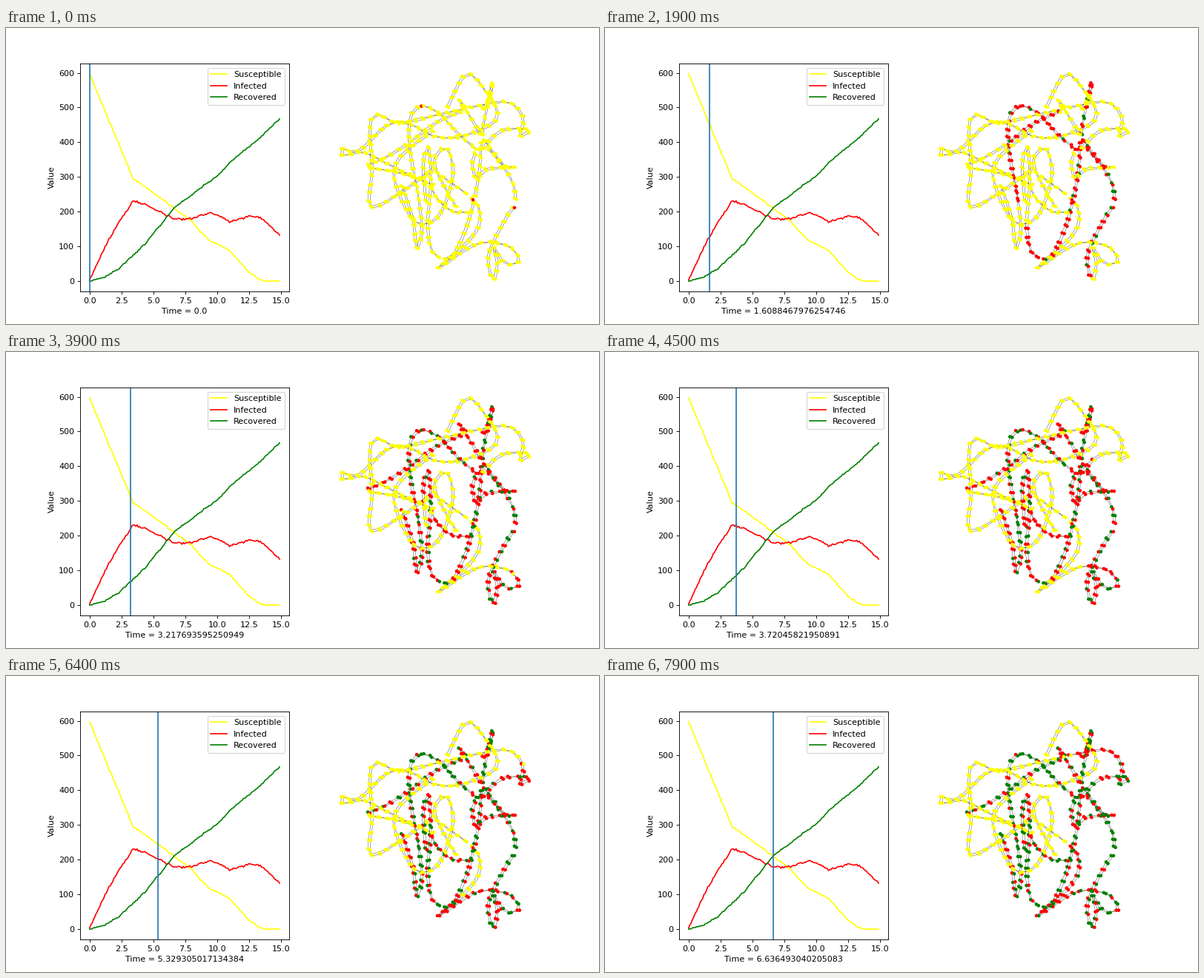
A matplotlib script that plays this animation: 800x400 px, repeating every 8000 ms.

```python
import numpy as np
import matplotlib.pyplot as plt
from matplotlib.animation import FuncAnimation
from matplotlib.collections import LineCollection

N = 600
FRAMES, INTERVAL = 80, 100
STEP = 0.10055292485159216
GAP = 11        # pixels between neighbouring pairs of nodes
RECOVERY = 5.0  # mean time a node stays infected
SEEDS = (632, 232), (558, 104), (688, 238)
COLORS = np.array([[1, 1, 0], [1, 0, 0], [0, 0.5, 0]])

rng = np.random.default_rng(11)
times = np.arange(149) * STEP
pos, hit, edges = [], [], []


def spline(points, per=24):
    """Catmull-Rom curve through the points."""
    p = np.array(points, float)
    p = np.vstack([2 * p[0] - p[1], p, 2 * p[-1] - p[-2]])
    u = np.linspace(0, 1, per, endpoint=False)[:, None]
    parts = [0.5 * (2 * b + (c - a) * u
                    + (2 * a - 5 * b + 4 * c - d) * u ** 2
                    + (3 * b - a - 3 * c + d) * u ** 3)
             for a, b, c, d in zip(p, p[1:], p[2:], p[3:])]
    return np.vstack(parts + [p[-2:-1]])


def chain(t0, t1, *points):
    """Two parallel rows of nodes that the infection crosses from t0 to t1."""
    curve = spline(points)
    dist = np.r_[0, np.cumsum(np.hypot(*np.diff(curve, axis=0).T))]
    n = round(dist[-1] / GAP)
    s = (np.arange(n) + 0.5 + rng.uniform(-0.15, 0.15, n)) * dist[-1] / n
    mid = np.c_[np.interp(s, dist, curve[:, 0]), np.interp(s, dist, curve[:, 1])]
    angle = rng.normal(0.4, 0.4, n)
    shift = 1.6 * np.c_[np.cos(angle), np.sin(angle)]
    for side in (-1, 1):
        row = mid + side * shift
        pos.extend(row)
        hit.extend(t0 + (t1 - t0) * (s + side * GAP / 4) / dist[-1])
        edges.extend(zip(row, row[1:]))
    edges.extend(zip(mid - shift, mid + shift))


def trend(*keys):
    """Straight runs between key points with a small seeded wobble."""
    t, v = np.array(keys, float).T
    return np.sort(np.interp(times, t, v) + rng.normal(0, 1.5, len(times)))


# Chains that lead away from the three seeds
chain(0, 1, (632, 232), (621, 270), (603, 308), (589, 313))
chain(1, 3.6, (589, 313), (574, 300), (569, 264), (573, 210), (570, 160),
      (563, 185), (567, 240))
chain(0, 1, (632, 232), (639, 190), (642, 148))
chain(0.1, 2.1, (642, 148), (645, 126), (657, 72), (649, 103), (638, 113))
chain(0, 1, (558, 104), (583, 114), (613, 146), (641, 168))
chain(0, 3.3, (558, 104), (545, 122), (545, 165), (557, 232), (561, 275),
      (554, 297), (549, 258), (533, 210))
chain(0, 6.6, (688, 238), (674, 258), (651, 306), (657, 341), (663, 318), (658, 297),
      (674, 319), (693, 314), (676, 294), (635, 292), (584, 324), (613, 299),
      (637, 270), (638, 243), (624, 226))
chain(0, 1, (688, 238), (684, 210), (666, 180), (642, 147))

# Side branches
chain(1, 2.2, (543, 156), (582, 127), (618, 110), (610, 97), (625, 118), (642, 147))
chain(2.2, 3.2, (543, 156), (514, 174), (484, 187))
chain(1, 3.2, (648, 160), (672, 186), (685, 188), (648, 191), (634, 204),
      (629, 178), (636, 166))
chain(2.5, 3.3, (628, 250), (598, 246), (577, 224), (573, 212))
chain(3.3, 6.7, (641, 165), (668, 139), (707, 137), (692, 146), (698, 122),
      (676, 100), (622, 108))

# Parts still untouched when the loop ends
chain(6.6, 9, (622, 108), (580, 118), (530, 128), (500, 117), (491, 135), (494, 190),
      (492, 241), (530, 224), (581, 187))
chain(7, 12, (594, 110), (620, 63), (643, 80), (663, 121), (620, 145), (580, 147),
      (545, 130), (515, 131), (476, 166), (452, 163), (457, 174), (482, 168),
      (533, 193), (550, 199))
chain(7, 10, (486, 188), (535, 197), (582, 214))
chain(7, 12, (610, 247), (578, 185), (594, 162), (603, 200), (583, 255), (552, 262),
      (526, 212), (529, 178), (580, 135))
chain(7, 9, (624, 226), (585, 198))

pos, hit = np.array(pos), np.array(hit)
hit = np.maximum(hit, STEP / 2)
for seed in SEEDS:
    hit[np.argmin(np.hypot(*(pos - seed).T))] = 0
heal = hit + rng.exponential(RECOVERY, len(hit))

sus = trend((0, 597), (2, 420), (3.4, 296), (5, 255), (8, 172), (9.4, 114), (10, 109),
            (11, 87), (12.5, 25), (13.6, 0), (15, 0))[::-1].clip(0, N - 3)
rec = trend((0, 0), (1.2, 11), (2.3, 36), (4.3, 105), (6.6, 210), (10, 303),
            (11, 343), (13, 402), (15, 471)).clip(0)
sus[0], rec[0] = N - 3, 0
sus[times > 13.6] = 0

fig, (ax, spare) = plt.subplots(1, 2, figsize=(10, 5), dpi=80)
spare.remove()
for data, color, label in ((sus, "yellow", "Susceptible"),
                           (N - sus - rec, "red", "Infected"),
                           (rec, "green", "Recovered")):
    ax.plot(times, data, color=color, label=label)
ax.set_xlim(ax.get_xlim())
ax.set_ylabel("Value")
ax.legend(loc="upper right")
marker = ax.axvline(0)

net = fig.add_axes([0, 0, 1, 1])
net.set(xlim=(0, 800), ylim=(400, 0))
net.axis("off")
net.add_collection(LineCollection(edges, colors="black", linewidths=0.3, zorder=1))
nodes = net.scatter(*pos.T, s=10, linewidths=1, zorder=2)


def draw(frame):
    t = float(int(frame / 1.2 + 0.4) * STEP)
    marker.set_xdata([t, t])
    ax.set_xlabel(f"Time = {t}")
    nodes.set_color(COLORS[(hit <= t).astype(int) + (heal <= t)])
    return marker, nodes


anim = FuncAnimation(fig, draw, frames=FRAMES, interval=INTERVAL, repeat=True, blit=False)
plt.show()
```
